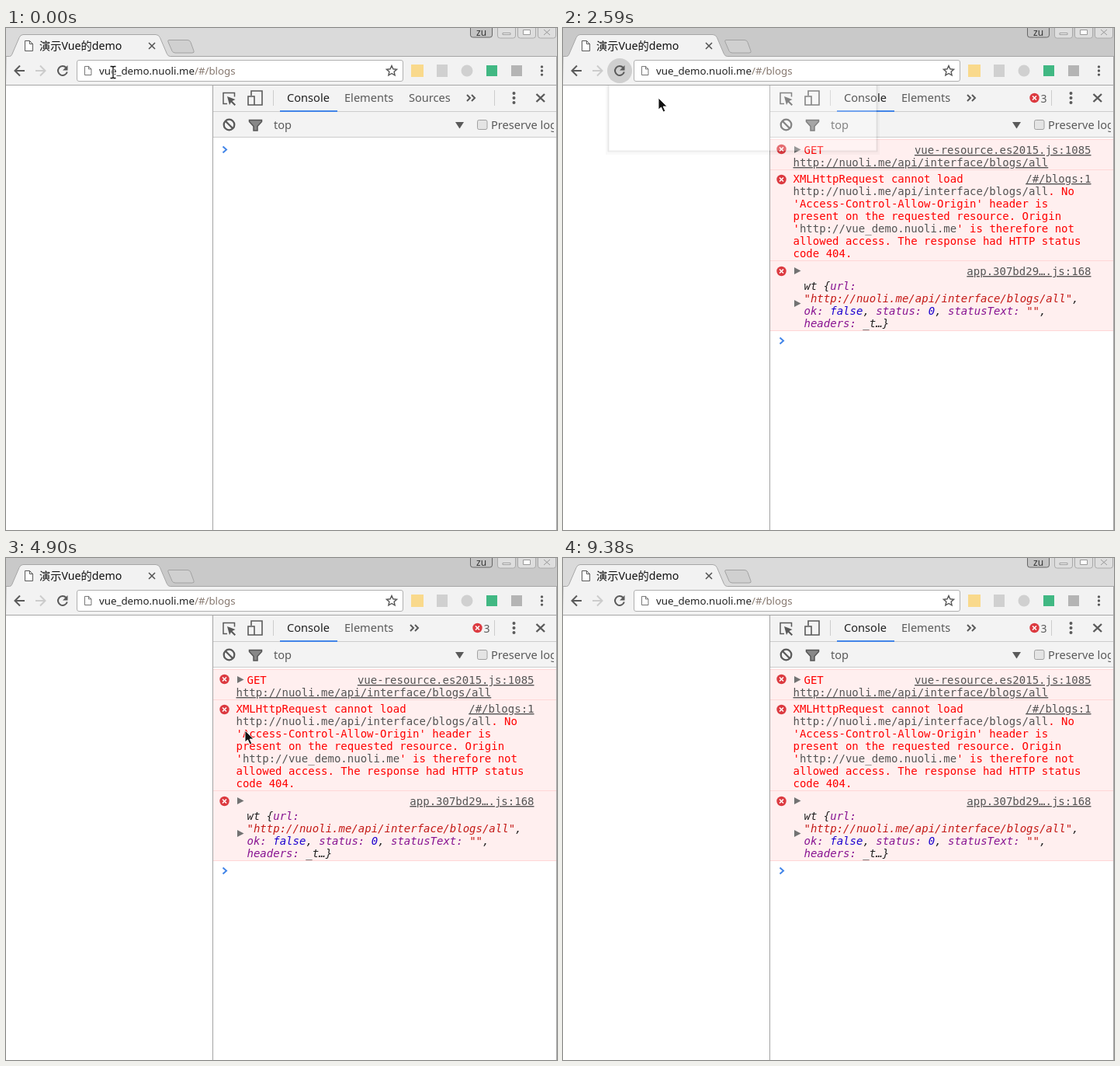
Recreate the animation shown at these times as an HTML page. Size 710 px wide and 646 px high, loop 9.59 s.

```html
<!DOCTYPE html>
<html lang="zh">
<head>
<meta charset="utf-8">
<style>
html, body { margin: 0; width: 100%; height: 100%; overflow: hidden; background: #fff; }
svg { display: block; }
text { white-space: pre; font: 14.6px "Noto Sans", "Open Sans", sans-serif; fill: #5a5a5a; }
.tab { font: 14.2px "Noto Sans", "Noto Sans CJK SC", "Noto Sans CJK", sans-serif; fill: #111; }
.url { font-size: 13.3px; fill: #222; }
.log text { font: 14px "DejaVu Sans Mono", monospace; fill: #f00; }
.log .link { fill: #545454; text-decoration: underline; }
.log .end { text-anchor: end; }
.log .obj { font-style: italic; fill: #222; }
.grey { fill: #545454; }
.key { fill: #881391; }
.str { fill: #c41a16; }
.val { fill: #1c00cf; }
.line { fill: none; stroke: #5a5a5a; stroke-width: 2; }
</style>
</head>
<body>
<svg width="710" height="646" viewBox="0 0 710 646">
  <defs>
    <g id="error">
      <circle r="6.2" fill="#dc3a40"/>
      <path d="M-2.5-2.5l5 5m0-5l-5 5" stroke="#fff" stroke-width="1.6"/>
    </g>
    <path id="fold" d="M0 0l8.500 4.500l-8.500 4.500z" fill="#727272"/>
    <path id="page" d="M.5.5h6l4 4v9h-10zM6.500.5v4h4" fill="#fff" stroke="#5a5a5a"/>
    <g id="dots" fill="#5a5a5a"><circle cy="-6" r="2"/><circle r="2"/><circle cy="6" r="2"/></g>
  </defs>

  <!-- title bar -->
  <rect id="bar" width="710" height="37"/>
  <g fill="#dedede" stroke="#aaa">
    <path d="M633.500-1v11q0 3 3 3h17q3 0 3-3v-11M659.500-1v11q0 3 3 3h17q3 0 3-3v-11M685.500-1v11q0 3 3 3h17q3 0 3-3v-11"/>
    <path d="M640 8.500h10v-2h-10zM666.500 2.500h9v6h-9zM693 2l8 7m0-7l-8 7" stroke="#999" fill="#fff"/>
    <path d="M598.500-1v10q0 3 3 3h22q3 0 3-3v-10" fill="#c4c4c4" stroke="#666"/>
  </g>
  <text x="606" y="10" style="font-size:12px;fill:#333">zu</text>
  <path d="M211 15.500h23q3 0 4 3l4 11q1 2.500-2 2.500h-22q-3 0-4-2.500l-5-11.500q-1-2.500 1-2.500z" fill="#d0d0d0" stroke="#a2a2a2"/>
  <path d="M0 36.500h4.500q2 0 3-2l9.500-22q1.500-4 5-4h171q4 0 5.500 4l9 21q1.500 3 4 3h499v37h-711z" fill="#f2f2f2" stroke="#a6a6a6"/>
  <use id="icon" href="#page" x="24" y="16"/>
  <text class="tab" x="43" y="28">演示Vue的demo</text>
  <path d="M184 19l8 8m0-8l-8 8" stroke="#555" stroke-width="1.6"/>

  <!-- toolbar -->
  <rect id="hover" x="61" y="43.500" width="24" height="24" rx="3" fill="#d8d8d8"/>
  <circle id="press" cx="73" cy="55" r="16" fill="#cfcfcf"/>
  <path class="line" d="M24 55h-12.500m6.500-6.500l-6.500 6.500l6.500 6.500"/>
  <path class="line" d="M38 55h12.500m-6.500-6.500l6.500 6.500l-6.500 6.500" style="stroke:#ccc"/>
  <path class="line" d="M77.500 51a6 6 0 1 0 1.300 5.500"/>
  <path d="M79.500 48v6.500h-6.500z" fill="#5a5a5a"/>
  <rect x="91.500" y="41.500" width="420" height="27" rx="2.500" fill="#fff" stroke="#b0b0b0"/>
  <use href="#page" transform="translate(101 49) scale(.85)"/>
  <text class="url" x="120" y="60">vue_demo.nuoli.me<tspan fill="#86786f">/#/blogs</tspan></text>
  <path d="M497 48.500l1.900 4.300l4.700.4l-3.500 3.100l1 4.600l-4.100-2.400l-4.100 2.400l1-4.600l-3.500-3.100l4.700-.4z" fill="none" stroke="#555" stroke-width="1.4"/>
  <rect x="522" y="47" width="16" height="16" fill="#f9d98c"/>
  <rect x="555" y="47" width="14" height="16" fill="#d0d0d0"/>
  <circle cx="594" cy="55" r="7.500" fill="#d0d0d0"/>
  <rect x="619" y="48" width="14" height="14" fill="#41b883"/>
  <rect x="651" y="48" width="14" height="14" fill="#b4b4b4"/>
  <use href="#dots" transform="translate(690.500 55) scale(.85)"/>

  <!-- inspector -->
  <rect x="267" y="74" width="442" height="67" fill="#f3f3f3"/>
  <path d="M267 107.500h442M267 140.500h442M344.500 80v20M629.500 80v20" stroke="#ccc"/>
  <path d="M266.500 74v572M709.500 37v609" stroke="#a3a3a3"/>
  <rect x="353" y="106" width="74" height="2" fill="#4285e8"/>
  <path class="line" d="M285 97.500h-5v-14h14.500v5" style="stroke-width:1.5"/>
  <path d="M285 88l10.500 4l-4 2l4.500 4.500l-1.500 1.500l-4.500-4.500l-2 3.500z" fill="#5a5a5a"/>
  <path class="line" d="M316 87v-6h14v18h-10M312 88h8v11h-8z" style="stroke-width:1.6"/>
  <text x="362" y="95" style="fill:#222">Console</text>
  <text x="436" y="95">Elements</text>
  <text id="sources" x="519" y="95">Sources</text>
  <path id="more" class="line" d="M0 86l4 4l-4 4m6-8l4 4l-4 4"/>
  <g id="count"><use href="#error" x="607.500" y="90"/><text x="615.500" y="95.500" style="font-size:14px">3</text></g>
  <use href="#dots" x="654.500" y="90"/>
  <path class="line" d="M683.500 85l10.500 10m0-10l-10.500 10" style="stroke-width:2.4"/>
  <circle class="line" cx="287.500" cy="124.500" r="6.800" style="stroke-width:2.3"/>
  <path class="line" d="M283 120l9 9" style="stroke-width:2.3"/>
  <path d="M313.500 118.500h16v2l-5.500 6v5.500h-5v-5.500l-5.500-6z" fill="#888" stroke="#555" stroke-width="1.5"/>
  <text x="345" y="130">top</text>
  <path d="M579 121h11l-5.500 8.500z" fill="#5a5a5a"/>
  <rect x="607.500" y="118.500" width="12.500" height="12" rx="2" fill="#e4e4e4" stroke="#a0a0a0"/>
  <svg x="600" y="110" width="106" height="29"><text x="25" y="20">Preserve log</text></svg>

  <g id="log" class="log">
    <path d="M267 143h442v247h-442z" fill="#ffefef"/>
    <path d="M267 143.500h442M267 182.500h442M267 299.500h442M267 389.500h442" stroke="#ffd7d7"/>
    <use href="#error" x="281.500" y="156"/>
    <use href="#error" x="281.500" y="195"/>
    <use href="#error" x="281.500" y="313"/>
    <use href="#fold" x="298" y="152"/>
    <use href="#fold" x="298" y="308"/>
    <use href="#fold" x="298" y="350"/>
    <text x="310.500" y="162">GET</text>
    <text class="link end" x="680.500" y="162">vue-resource.es2015.js:1085</text>
    <text class="link" x="296.500" y="178">http://nuoli.me/api/interface/blogs/all</text>
    <text x="296.500" y="199">XMLHttpRequest cannot load</text>
    <text class="link end" x="680.500" y="199">/#/blogs:1</text>
    <text x="296.500" y="215"><tspan class="grey">http://nuoli.me/api/interface/blogs/all</tspan>. No</text>
    <text x="296.500" y="231">'Access-Control-Allow-Origin' header is</text>
    <text x="296.500" y="247">present on the requested resource. Origin</text>
    <text x="296.500" y="263">'<tspan id="origin" class="grey">http://vue_demo.nuoli.me</tspan>' is therefore not</text>
    <text x="296.500" y="279">allowed access. The response had HTTP status</text>
    <text x="296.500" y="295">code 404.</text>
    <text class="link end" x="680.500" y="318">app.307bd29….js:168</text>
    <text class="obj" x="310.500" y="337">wt {<tspan class="key">url:</tspan></text>
    <text class="obj" x="310.500" y="353"><tspan class="str">"http://nuoli.me/api/interface/blogs/all"</tspan>,</text>
    <text class="obj" x="310.500" y="369"><tspan class="key">ok:</tspan> <tspan class="val">false</tspan>, <tspan class="key">status:</tspan> <tspan class="val">0</tspan>, <tspan class="key">statusText:</tspan> <tspan class="str">""</tspan>,</text>
    <text class="obj" x="310.500" y="385"><tspan class="key">headers:</tspan> _t…}</text>
  </g>
  <path id="prompt" d="M279.500-4l4.500 4l-4.500 4" fill="none" stroke="#4285e8" stroke-width="2"/>

  <!-- fading popup -->
  <g id="popup">
    <rect x="59" y="74" width="345" height="84" fill="#fff" opacity=".25"/>
    <path d="M58.500 74v84.500h346v-84.500" fill="none" stroke="#000" stroke-opacity=".07" stroke-width="2"/>
    <path d="M57 74v87h349v-87" fill="none" stroke="#000" stroke-opacity=".025" stroke-width="4"/>
  </g>

  <g id="beam" fill="none">
    <path d="M134.500 49.500h2.500l1 1l1-1h2.500M138 50v14M134.500 64.500h2.500l1-1l1 1h2.500" stroke="#fff" stroke-width="3"/>
    <path d="M134.500 49.500h2.500l1 1l1-1h2.500M138 50v14M134.500 64.500h2.500l1-1l1 1h2.500" stroke="#111" stroke-width="1.3"/>
  </g>
  <path id="arrow" d="M0 0v15l3.500-3l2.700 6l2.600-1.200l-2.700-5.800h5z" fill="#111" stroke="#fff" stroke-width=".9"/>
</svg>
<script>
const LOOP = 9590, STEP = 70;
const $ = id => document.getElementById(id);
const show = (id, on) => $(id).style.opacity = +on;
const ramp = (t, a, b) => Math.min(1, Math.max(0, (t - a) / (b - a)));

// pointer tip: time, x, y
const path = [
  [560, 133, 82], [700, 132, 63], [840, 132, 63], [1470, 72, 57], [2310, 72, 57],
  [2590, 123, 90], [2800, 322, 235], [3080, 322, 235], [3360, 330, 234], [3500, 330, 232],
  [4130, 330, 232], [4270, 323, 226], [4410, 323, 226], [4900, 308, 222], [5390, 308, 222],
  [6020, 426, 249], [6230, 426, 249], [6300, 427, 246], [6510, 455, 252], [6790, 496, 246],
  [7140, 496, 246], [7420, 535, 251], [7630, 571, 247], [7700, 571, 247], [7840, 568, 246],
  [8050, 568, 246], [8260, 527, 121]
];

function tip(t) {
  const i = Math.max(1, path.findIndex(p => p[0] >= t));
  const [a, x, y] = path[i - 1], [b, u, v] = path[i];
  const k = ramp(t, a, b);
  return [x + (u - x) * k, y + (v - y) * k];
}

function draw(now) {
  const t = Math.floor(now % LOOP / STEP) * STEP;
  const loaded = t >= 2100;
  const shade = t < 9380 ? 218 - 17 * ramp(t, 490, 700) : 218;
  $('bar').setAttribute('fill', `rgb(${shade},${shade},${shade})`);
  show('icon', t < 1820 || loaded);
  show('hover', t >= 1330 && t < 3850);
  show('press', t >= 1750 && t < 2800);
  show('sources', !loaded);
  show('count', loaded);
  show('log', loaded);
  $('more').setAttribute('transform', `translate(${loaded ? 521 : 594} 0)`);
  $('prompt').setAttribute('transform', `translate(0 ${loaded ? 402.5 : 156.5})`);
  show('popup', t < 2380 ? 0 : 1 - ramp(t, 3080, 3360));
  $('origin').style.textDecoration = t >= 6370 && t < 6720 ? 'underline' : 'none';
  show('beam', t < 560);
  show('arrow', t >= 560 && t < 8330);
  if (t <= 8260) $('arrow').setAttribute('transform', `translate(${tip(t)})`);
}

const start = performance.now();
function tick() {
  draw(performance.now() - start);
  requestAnimationFrame(tick);
}
tick();
</script>
</body>
</html>
```
